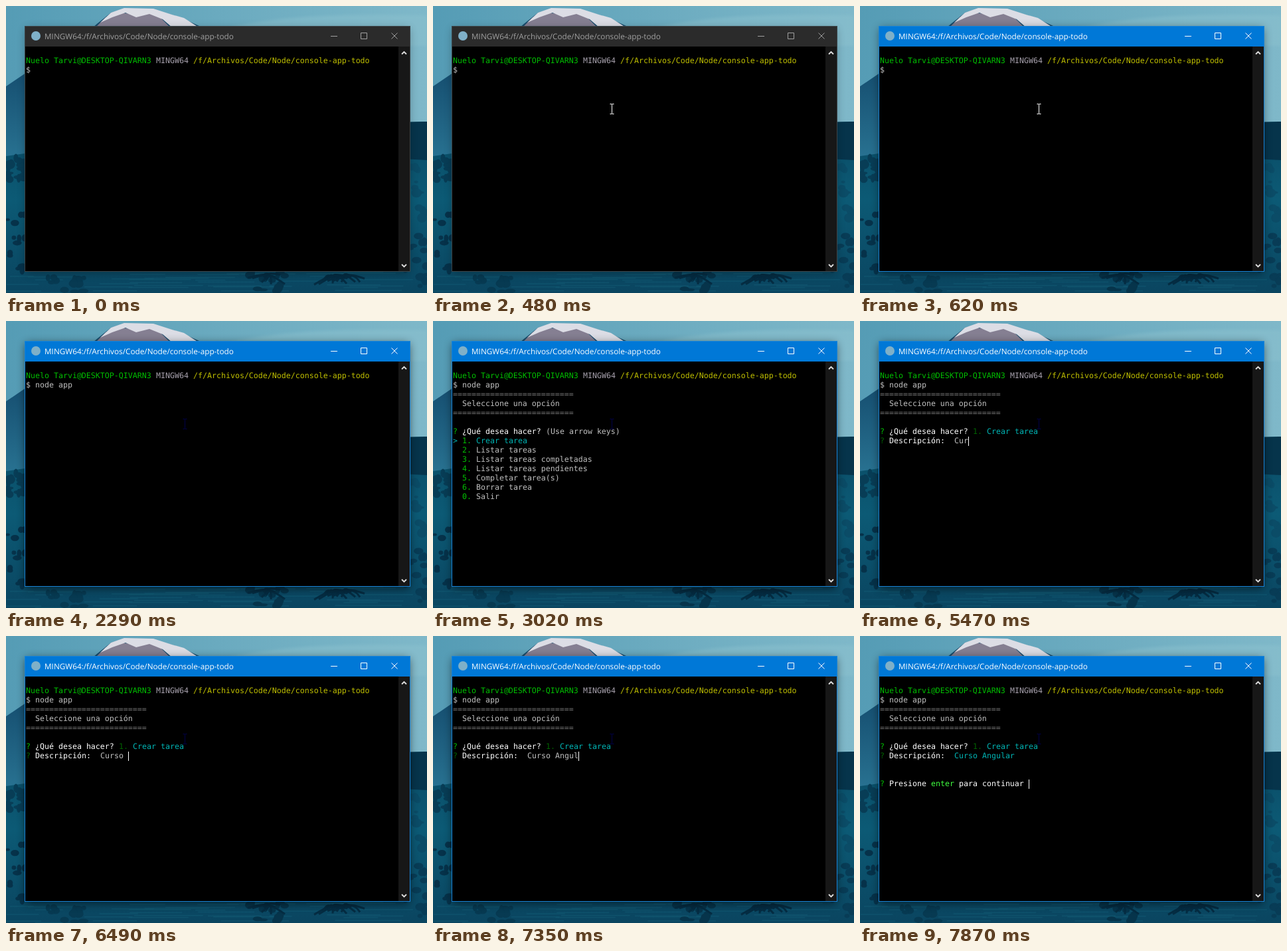
Recreate the animation shown at these times as an HTML page. Size 634 px wide and 432 px high, loop 8 s.

```html
<!DOCTYPE html>
<html lang="es">
<head>
<meta charset="utf-8">
<title>Terminal</title>
<style>
html, body { margin: 0; width: 100%; height: 100%; overflow: hidden; background: #0b4a63; }
svg { display: block; width: 634px; height: 432px; }
text { white-space: pre; }
.term text { font: 11.627px "DejaVu Sans Mono", "Noto Sans Mono", monospace; text-rendering: geometricPrecision; }
#title { font: 11.75px "Open Sans", "Noto Sans", sans-serif; text-rendering: geometricPrecision; }
</style>
</head>
<body>
<svg viewBox="0 0 634 432">
  <defs>
    <linearGradient id="sky"><stop stop-color="#559cb5"/><stop offset="1" stop-color="#7fb8c9"/></linearGradient>
    <linearGradient id="slope" x2="0" y2="1"><stop stop-color="#1c4f6e"/><stop offset=".3" stop-color="#12486a"/><stop offset="1" stop-color="#2a7594"/></linearGradient>
    <linearGradient id="land" x2="0" y2="1"><stop stop-color="#0a4a64"/><stop offset=".45" stop-color="#0c5a75"/><stop offset="1" stop-color="#0a4560"/></linearGradient>
    <filter id="soft"><feGaussianBlur stdDeviation="2"/></filter>
    <filter id="blur" x="-20%" y="-20%" width="140%" height="140%"><feGaussianBlur stdDeviation="7"/></filter>
  </defs>

  <rect width="634" height="432" fill="url(#sky)"/>
  <path d="M330 34Q430 8 634 14V60H330Z" fill="#8dc2cf" opacity=".45" filter="url(#soft)"/>
  <path d="M0 121L28 102 110 50 138 26 158 10 178 4 222 5 262 17 300 34 480 130 634 185V240H0Z" fill="url(#slope)"/>
  <path d="M136 31L150 17 172 10 198 13 226 11 246 31Z" fill="#857f92"/>
  <path d="M142 25L158 10 178 3 222 4 250 13 268 18 290 32H250L236 20 216 12 196 17 180 10 160 17Z" fill="#dcdde5"/>
  <path d="M0 226L28 222 300 200 590 175 634 174V432H0Z" fill="url(#land)"/>
  <path d="M560 176L634 174V232L560 228Z" fill="#06344b"/>
  <g id="scenery"></g>

  <rect id="shadow" x="30" y="34" width="577" height="368" fill="#000" filter="url(#blur)"/>
  <rect id="frame" x="28" y="30" width="581" height="370"/>
  <rect id="bar" x="29" y="31" width="579" height="30"/>
  <rect x="29" y="61" width="562" height="338"/>
  <rect x="591" y="61" width="17" height="338" fill="#171717"/>
  <path d="M596 72.5l3.5-3.5 3.5 3.5M596 389l3.5 3.5 3.5-3.5" fill="none" stroke="#dedede" stroke-width="1.8"/>
  <circle cx="45" cy="45" r="7" fill="#7fb0c8"/>
  <text id="title" x="58" y="50">MINGW64:/f/Archivos/Code/Node/console-app-todo</text>
  <path id="buttons" d="M489 45.5h10M534.5 40.5h9v9h-9zM580.5 40.5l9 9M589.5 40.5l-9 9" fill="none"/>

  <path id="beam" d="M-3 -7.5h2.5l.5 .5 .5 -.5h2.5M0 -7V7M-3 7.5h2.5l.5 -.5 .5 .5h2.5" fill="none"/>
  <path id="arrow" d="M.5 .5V16.5L4.3 12.9 6.8 18.6 9.3 17.5 6.8 12H12Z" fill="#fff" stroke="#000"/>
  <g class="term" id="screen"></g>
  <rect id="caret" width="1" height="14" fill="#fff"/>
</svg>
<script>
const LOOP = 8000, CELL = 7, LINE = 14, LEFT = 30, TOP = 76;
const GREEN = '#00bf00', DIM_GREEN = '#006400', LIME = '#40ff40', YELLOW = '#bfbf00',
      CYAN = '#00b4b4', GREY = '#bfbfbf', DIM = '#777', MAUVE = '#a7a1ad', WHITE = '#fff';
const $ = id => document.getElementById(id);
const set = (id, attrs) => Object.entries(attrs).forEach(([k, v]) => $(id).setAttribute(k, v));

function drawScenery() {
  let seed = 7;
  const rnd = (a, b) => a + (b - a) * ((seed = seed * 16807 % 2147483647) / 2147483647);
  let out = '';
  const blobs = (n, x0, x1, y0, y1, color) => {
    for (let i = 0; i < n; i++)
      out += `<ellipse cx="${rnd(x0, x1)}" cy="${rnd(y0, y1)}" rx="${rnd(3, 8)}" ry="${rnd(2, 7)}" fill="${color}"/>`;
  };
  for (let i = 0; i < 36; i++)
    out += `<rect x="${rnd(0, 560)}" y="${rnd(398, 431)}" width="${rnd(30, 110)}" height="1.5" fill="#145f79" opacity=".45"/>`;
  blobs(18, 0, 30, 228, 262, '#083d56');
  blobs(14, 0, 30, 312, 400, '#06324a');
  blobs(12, 606, 634, 235, 330, '#0b4c67');
  blobs(16, 600, 634, 345, 430, '#083c56');
  blobs(14, 60, 120, 408, 432, '#073a52');
  blobs(14, 365, 420, 400, 430, '#06344b');
  for (const x of [392, 492, 512])
    for (let a = 0; a < 9; a++)
      out += `<path d="M${x} 410q${rnd(-14, 14)} -10 ${(a - 4) * 7} ${rnd(-6, 12)}" fill="none" stroke="#052c42" stroke-width="3"/>`;
  $('scenery').innerHTML = out;
}

// A row is its line number followed by [color, text] runs.
const prompt = [0, [GREEN, 'Nuelo Tarvi@DESKTOP-QIVARN3 '], [MAUVE, 'MINGW64 '], [YELLOW, '/f/Archivos/Code/Node/console-app-todo']];
const rule = [DIM, '='.repeat(26)];
const header = [[2, rule], [3, [GREY, '  Seleccione una opción']], [4, rule]];
const question = [[GREEN, '? '], [WHITE, '¿Qué desea hacer? ']];
const options = ['Listar tareas', 'Listar tareas completadas', 'Listar tareas pendientes', 'Completar tarea(s)', 'Borrar tarea', 'Salir'];
const menu = [
  [6, ...question, [GREY, '(Use arrow keys)']],
  [7, [CYAN, '> '], [GREEN, '1. '], [CYAN, 'Crear tarea']],
  ...options.map((label, i) => [8 + i, [GREEN, `  ${(i + 2) % 7}. `], [GREY, label]])
];

const commandKeys = [[1610, 'n'], [1680, 'no'], [1750, 'nod'], [1820, 'node'], [2090, 'node a'], [2190, 'node ap'], [2290, 'node app']];
const answerKeys = [[5140, 'C'], [5340, 'Cu'], [5470, 'Cur'], [5670, 'Curs'], [5740, 'Curspo'], [6160, 'Cursp'], [6260, 'Curs'],
  [6360, 'Curso'], [6490, 'Curso '], [6690, 'Curso A'], [6870, 'Curso An'], [7000, 'Curso Ang'], [7150, 'Curso Angu'],
  [7350, 'Curso Angul'], [7440, 'Curso Angula'], [7540, 'Curso Angular']];
const typed = (keys, t) => keys.reduce((text, [at, value]) => t >= at ? value : text, '');

function rowsAt(t) {
  const rows = [prompt, [1, [GREY, '$ ' + typed(commandKeys, t)]]];
  if (t >= 3020) rows.push(...header);
  if (t >= 4410) {
    const done = t >= 7870;
    rows.push([6, ...question, [DIM_GREEN, '1. '], [CYAN, 'Crear tarea']],
      [7, [DIM_GREEN, '? '], [WHITE, 'Descripción:  '], [done ? CYAN : GREY, typed(answerKeys, t)]]);
    if (done) rows.push([10, [GREEN, '? '], [WHITE, 'Presione '], [LIME, 'enter'], [WHITE, ' para continuar']]);
  } else if (t >= 3020) rows.push(...menu);
  return rows;
}

function rowMarkup([line, ...runs]) {
  let col = 0;
  return runs.map(([color, text]) => {
    const x = LEFT + col * CELL;
    col += text.length;
    return `<text x="${x}" y="${TOP + line * LINE + 10}" fill="${color}">${text.replace('>', '&gt;')}</text>`;
  }).join('');
}

function drawWindow(t) {
  const active = t >= 620;
  set('shadow', { opacity: t >= 750 ? .6 : active ? .5 : .3 });
  set('frame', { fill: active ? '#1883d7' : '#3c4549' });
  set('bar', { fill: active ? '#0078d7' : '#2b2b2b' });
  set('title', { fill: active ? WHITE : '#a0a0a0' });
  set('buttons', { stroke: active ? WHITE : '#a0a0a0' });
}

function drawPointer(t) {
  const step = Math.min(6, Math.floor((t - 70) / (410 / 6) + .05));
  const ease = 1 - (1 - step / 6) ** 2;
  const x = Math.round(586 - 317 * ease) + .5, y = Math.round(416 - 261 * ease);
  const inside = x < 591 && y < 399;
  set('beam', { transform: `translate(${x} ${y})`, stroke: t >= 1610 ? '#000048' : WHITE, visibility: t >= 70 && inside ? 'visible' : 'hidden' });
  set('arrow', { transform: `translate(${x - .5} ${y})`, visibility: t >= 70 && !inside ? 'visible' : 'hidden' });
}

function drawCaret(t) {
  const done = t >= 7870;
  const col = done ? 32 : 16 + typed(answerKeys, t).length;
  const shown = t >= 4410 && !(t >= 4940 && t < 5140);
  set('caret', { x: LEFT + col * CELL, y: TOP + (done ? 10 : 7) * LINE, visibility: shown ? 'visible' : 'hidden' });
}

let lastMarkup = '';
function render(t) {
  drawWindow(t);
  drawPointer(t);
  drawCaret(t);
  const markup = rowsAt(t).map(rowMarkup).join('');
  if (markup !== lastMarkup) $('screen').innerHTML = lastMarkup = markup;
}

drawScenery();
const start = performance.now();
function tick() {
  render((performance.now() - start) % LOOP);
  requestAnimationFrame(tick);
}
tick();
</script>
</body>
</html>
```
